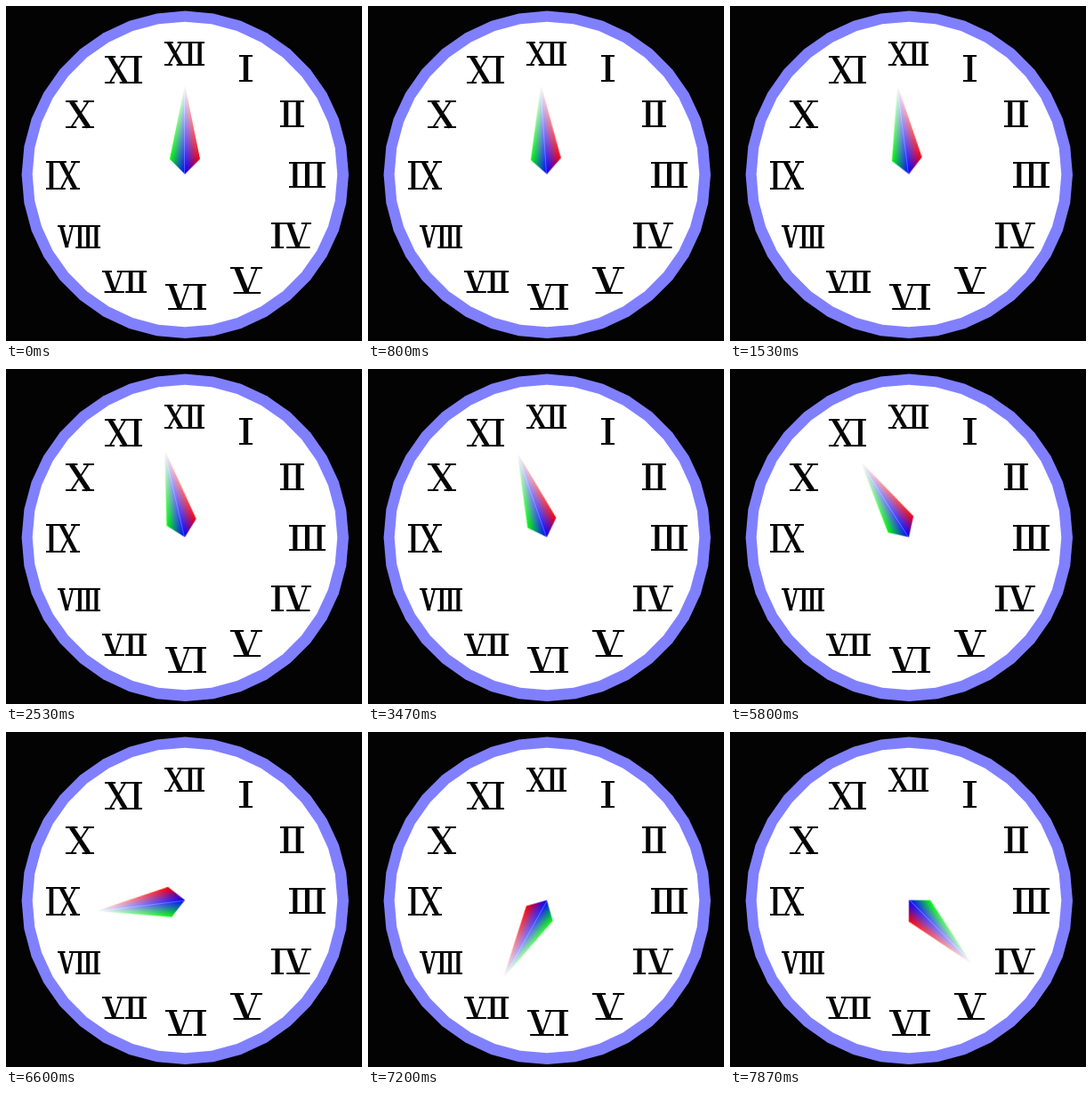
Recreate the animation shown at these times as an HTML page. Size 400 px wide and 376 px high, loop 7.94 s.

```html
<!DOCTYPE html>
<html lang="en">
<head>
<meta charset="utf-8">
<title>Clock</title>
<style>
  html, body { margin: 0; height: 100%; overflow: hidden; background: #030303; }
  svg { display: block; width: 100%; height: 100%; }
  .numeral path { fill: none; stroke: #050505; }
  .hand { animation: turn 7.94s infinite; }
  .half { isolation: isolate; }
  .half use { mix-blend-mode: multiply; }

  /* A slow counter-clockwise drift, then a fast spin, at 15 steps a second. */
  @keyframes turn {
    0%     { transform: rotate(0deg);      animation-timing-function: steps(23); }
    19.26% { transform: rotate(-7.3deg);   animation-timing-function: steps(29); }
    43.7%  { transform: rotate(-19.3deg);  animation-timing-function: steps(17); }
    57.93% { transform: rotate(-25.7deg);  animation-timing-function: steps(18); }
    73.04% { transform: rotate(-32.6deg);  animation-timing-function: steps(2); }
    74.73% { transform: rotate(-33.4deg);  animation-timing-function: steps(10); }
    83.12% { transform: rotate(-97deg);    animation-timing-function: steps(19); }
    99.11% { transform: rotate(-224.7deg); animation-timing-function: steps(1); }
    100%   { transform: rotate(-231.4deg); }
  }
</style>
</head>
<body>
<svg viewBox="0 0 400 376">
  <defs>
    <!-- Each gradient takes out one colour channel across half of the hand. -->
    <linearGradient id="cyanBase" gradientUnits="userSpaceOnUse" x1="0" y1="0" x2="50.5" y2="-50.5">
      <stop stop-color="#0ff"/><stop offset="1" stop-color="#fff"/>
    </linearGradient>
    <linearGradient id="magentaBase" href="#cyanBase" gradientUnits="userSpaceOnUse" x1="0" y1="0" x2="50.5" y2="-50.5">
      <stop stop-color="#f0f"/><stop offset="1" stop-color="#fff"/>
    </linearGradient>
    <linearGradient id="cyanEdge" gradientUnits="userSpaceOnUse" x1="0" y1="0" x2="-19.64" y2="-3.97">
      <stop stop-color="#0ff"/><stop offset="1" stop-color="#fff"/>
    </linearGradient>
    <linearGradient id="magentaEdge" gradientUnits="userSpaceOnUse" x1="0" y1="0" x2="-19.64" y2="-3.97">
      <stop stop-color="#f0f"/><stop offset="1" stop-color="#fff"/>
    </linearGradient>
    <linearGradient id="yellowSide" gradientUnits="userSpaceOnUse" x1="-17" y1="0" x2="0" y2="0">
      <stop stop-color="#ff0"/><stop offset="1" stop-color="#fff"/>
    </linearGradient>
    <!-- The halves overlap slightly along the axis so that no seam shows. -->
    <path id="half" d="M0 0L-17 -17L0 -101L.7 -60L.7 -1Z"/>
  </defs>

  <path id="rim" fill="#8080ff"/>
  <path id="face" fill="#fff"/>
  <g id="numerals"></g>

  <g transform="translate(201 188.7)">
    <g class="hand">
      <g class="half">
        <use href="#half" fill="url(#cyanBase)"/>
        <use href="#half" fill="url(#magentaEdge)"/>
        <use href="#half" fill="url(#yellowSide)"/>
      </g>
      <g class="half" transform="scale(-1 1)">
        <use href="#half" fill="url(#magentaBase)"/>
        <use href="#half" fill="url(#cyanEdge)"/>
        <use href="#half" fill="url(#yellowSide)"/>
      </g>
    </g>
  </g>
</svg>
<script>
  const SVG = "http://www.w3.org/2000/svg";
  const SIDES = 36;

  function polygon(cx, cy, r) {
    const points = Array.from({ length: SIDES }, (_, i) => {
      const a = i * 2 * Math.PI / SIDES;
      return `${cx + r * Math.cos(a)} ${cy + r * Math.sin(a)}`;
    });
    return `M${points.join("L")}Z`;
  }

  // Strokes as [x1, y1, x2, y2] in a unit cell: thick, thin and serif lines.
  const LETTERS = {
    I: { width: 1, thick: [[.5, 0, .5, 1]], thin: [], serif: [[0, 0, 1, 0], [0, 1, 1, 1]] },
    V: { width: 2.2, thick: [[.2, 0, .52, 1]], thin: [[.83, 0, .52, 1]],
         serif: [[0, 0, .42, 0], [.64, 0, 1, 0]] },
    X: { width: 2.2, thick: [[.2, 0, .8, 1]], thin: [[.8, 0, .2, 1]],
         serif: [[0, 0, .42, 0], [.62, 0, 1, 0], [0, 1, .38, 1], [.58, 1, 1, 1]] }
  };

  function addNumeral(label, left, top, width, height, footed) {
    const group = document.createElementNS(SVG, "g");
    group.setAttribute("class", "numeral");
    group.setAttribute("role", "img");
    group.setAttribute("aria-label", label);

    const letters = [...label].map(c => LETTERS[c]);
    const unit = width / letters.reduce((sum, l) => sum + l.width, 0);
    const weight = { thick: 1.8 + .24 * unit, thin: 1.9, serif: 1.9 };
    const inset = weight.serif / 2;

    for (const kind in weight) {
      let x = left, d = "";
      for (const letter of letters) {
        const w = letter.width * unit;
        const lines = [...letter[kind]];
        if (footed && kind === "serif" && letter === LETTERS.V) lines.push([.1, 1, .95, 1]);
        const at = (u, v) => `${x + u * w} ${top + inset + v * (height - 2 * inset)}`;
        for (const [x1, y1, x2, y2] of lines) d += `M${at(x1, y1)}L${at(x2, y2)}`;
        x += w;
      }
      const path = document.createElementNS(SVG, "path");
      path.setAttribute("d", d);
      path.setAttribute("stroke-width", weight[kind]);
      group.append(path);
    }
    document.getElementById("numerals").append(group);
  }

  document.getElementById("rim").setAttribute("d", polygon(201.3, 189.3, 183.7));
  document.getElementById("face").setAttribute("d", polygon(201, 189, 171.3));

  addNumeral("XII", 178, 40, 45, 27);
  addNumeral("I", 262, 55, 15, 30);
  addNumeral("II", 308, 106, 27, 30);
  addNumeral("III", 318, 175, 41, 29);
  addNumeral("IV", 298, 243, 45, 29, true);
  addNumeral("V", 252, 293, 36, 30, true);
  addNumeral("VI", 179, 312, 46, 29, true);
  addNumeral("VII", 108, 297, 50, 25, true);
  addNumeral("VIII", 58, 246, 48, 26);
  addNumeral("IX", 45, 174, 38, 32);
  addNumeral("X", 67, 106, 32, 31);
  addNumeral("XI", 111, 56, 42, 31);
</script>
</body>
</html>
```
